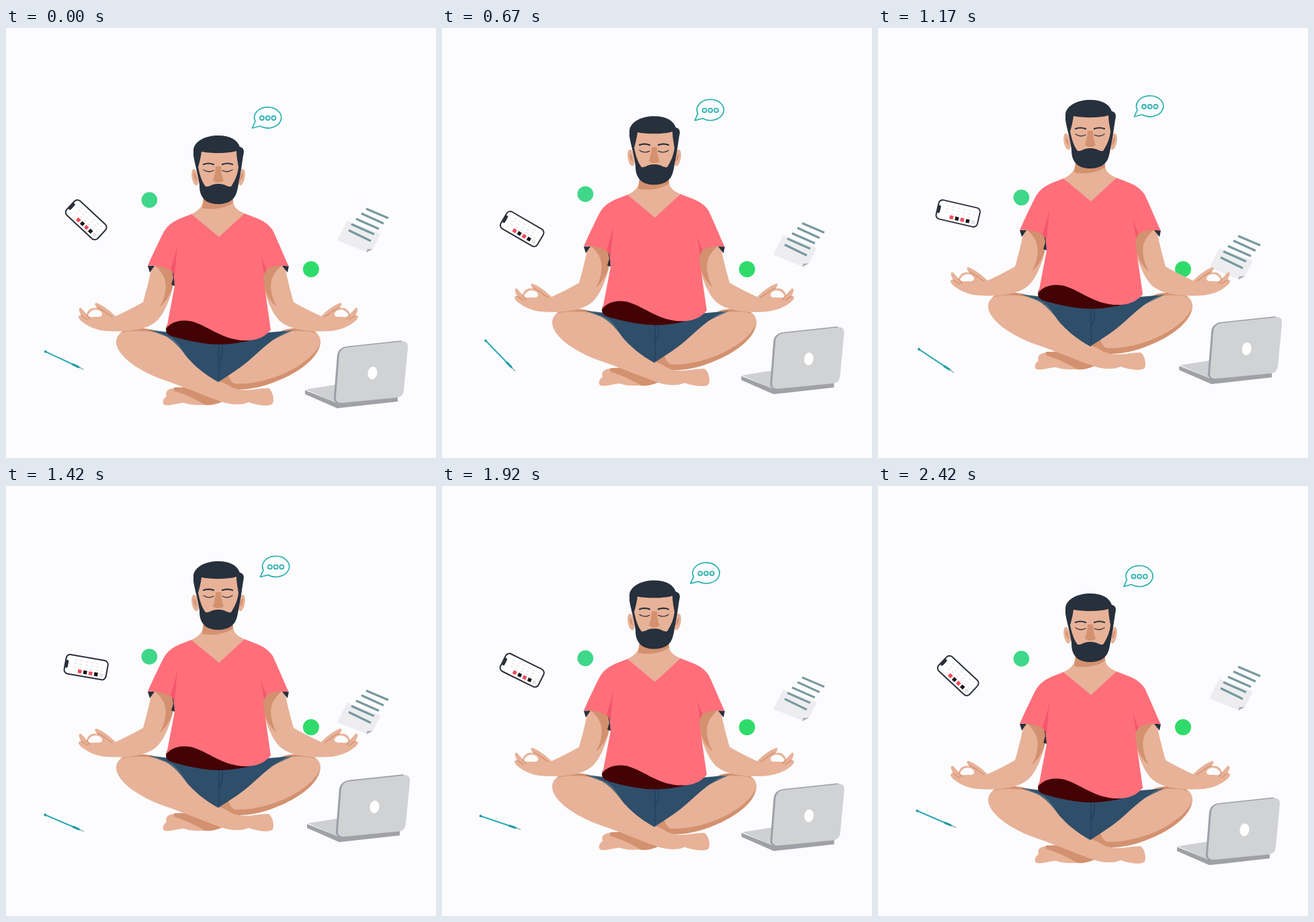
These frames come from a looping animation (640 by 640 pixels, 2510 ms). An HTML page:

```html
<!DOCTYPE html>
<html lang="en">
<head>
<meta charset="utf-8">
<title>Floating meditation</title>
<style>
  html, body { margin: 0; width: 100%; height: 100%; overflow: hidden; background: #fcfcfe; }
  svg { display: block; width: 100%; height: 100%; }
  .skin { fill: #e7b298; }
  .shade { fill: #d3916f; }
  .hair { fill: #27303d; }
  .shirt { fill: #ff6f7a; }
  .crease { fill: #f4566c; }
  .line { fill: none; stroke-linecap: round; stroke-linejoin: round; }
</style>
</head>
<body>
<svg viewBox="0 0 640 640">
  <defs>
    <g id="arm">
      <path class="skin" fill-rule="evenodd" d="M219 344 C214 372 209 390 204 408 C192 415 178 422 163 429
        C153 419 143 412 134 409 C131 410 133 414 136 417 C128 415 122 419 120 426
        L112 417 C107 415 108 421 112 428 C106 427 107 432 113 437 C122 444 134 450 150 451
        C180 453 206 450 222 438 C235 428 245 402 249 383 L252 344 Z
        M122 428 C125 419 135 417 141 422 C145 426 143 430 137 430 C131 429 126 432 122 428 Z"/>
      <path class="shade" d="M216 350 C234 361 240 376 237 392 C236 400 233 408 229 415 C240 406 247 392 249 380 L252 350 Z"/>
      <path class="line" stroke="#d3916f" stroke-width="1.4" d="M136 416 C143 418 148 424 158 430 M112 428 L121 434 M120 427 L125 433"/>
    </g>
    <path id="knee" class="shade" d="M170 454 C182 445 202 446 217 449 L234 456 C210 450 188 449 170 454 Z"/>
  </defs>

  <g id="note">
    <path fill="#ededef" d="M508 287 L493 316 L538 334 L546 329 L558 306 Z"/>
    <path fill="#a9adb3" d="M536 334 L538 329 L546 329 Z"/>
    <path class="line" style="stroke-linecap:butt" stroke="#76999d" stroke-width="3.2"
      d="M536 269 L569 283 M529 276 L562 291 M521 284 L555 299 M514 292 L548 307 M510 301 L543 317"/>
  </g>

  <circle cx="454" cy="359" r="12" fill="#2fdc6b"/>
  <circle id="badge" r="11.8" fill="#3fd78a"/>

  <g id="bubble" class="line" stroke="#33b3b4" stroke-width="1.8">
    <path d="M371 139 A20 15.5 0 1 1 378 146 L366.5 149 Z"/>
    <circle cx="381" cy="134" r="3"/>
    <circle cx="389.7" cy="134" r="3"/>
    <circle cx="398.4" cy="134" r="3"/>
  </g>

  <g id="phone">
    <rect x="-31.5" y="-14.5" width="63" height="29" rx="6" fill="#fff" stroke="#2a2f3c" stroke-width="2"/>
    <rect x="-31.5" y="-6" width="4.500" height="12" rx="2" fill="#2a2f3c"/>
    <path class="line" stroke="#e7e5e6" stroke-width="1.4" stroke-dasharray="3 5.2"
      d="M-18 -8 H24 M-18 -3 H24 M-18 2 H24"/>
    <g id="icons"></g>
  </g>

  <g id="pencil">
    <path class="line" stroke="#2fa9b3" stroke-width="2.100" d="M-31 0 H26"/>
    <path class="line" stroke="#1f9ba6" stroke-width="3.2" d="M15 0 H23"/>
    <path class="line" stroke="#8fb3ae" stroke-width="1.4" d="M26 0 H32"/>
    <circle cx="-30.5" r="1.9" fill="#1f9ba6"/>
  </g>

  <g id="laptop">
    <path fill="#9fa1a6" d="M445 539 L490 557 L583 549 V556 L493 566 L445 545 Z"/>
    <path fill="#cfd0d3" d="M446 538 L490 531 V557 Z"/>
    <path id="rim" fill="#9c9fa8" transform="translate(-3 .3)"/>
    <path id="lid" fill="#d0d2d4" d="M508 475 L588 466 Q599 465 598 476 L592 539 Q591 549 582 550 L499 558 Q490 558 491 549 L496 486 Q498 476 508 475 Z"/>
    <path class="line" stroke="#9c9fa8" stroke-width="1.6" d="M497 481 Q500 475 508 474.500 L588 466"/>
    <ellipse cx="545.5" cy="513.5" rx="7" ry="9.5" fill="#fff" transform="rotate(8 545.5 513.5)"/>
  </g>

  <g id="man">
    <!-- legs -->
    <path class="skin" d="M254 536 C242 535 236 541 239 548 C233 552 232 559 236 561 C246 563 255 558 265 558 C280 563 303 562 322 556 L330 535 Z"/>
    <path class="shade" d="M250 535 L282 534 L322 556 C314 560 305 562 296 561 C284 553 268 546 250 540 Z"/>
    <path class="shade" d="M427 450 C450 445 468 450 468 468 C466 490 438 512 402 526 C378 536 352 540 334 537 L316 525 Z"/>
    <path class="skin" d="M427 450 C450 445 468 450 468 468 C460 489 432 508 402 519 C376 528 352 531 339 529 C332 524 332 517 330 516 L395 455 Z"/>
    <path class="skin" d="M214 450 C190 444 164 448 164 468 C165 488 198 511 235 524 C262 533 292 546 320 556 C338 562 352 561 361 557 C374 561 388 564 396 560 C400 556 398 541 391 536 C372 535 350 546 328 530 L316 525 L260 465 Z"/>
    <use href="#knee"/>
    <use href="#knee" transform="translate(632 0) scale(-1 1)"/>
    <path fill="#4c6a7b" d="M212 449 L245 453 L390 453 L427 450 C410 458 398 463 388 470 L316 520 L272 493 C260 478 252 467 238 459 Z"/>
    <path fill="#2f4e6a" d="M225 452 L317 462 L418 451 C396 463 382 477 366 491 C352 504 334 515 316 527 C296 516 279 502 268 488 C260 476 256 466 244 460 Z"/>
    <path class="line" stroke="#233f59" stroke-width="1.3" d="M322 471 C323 482 322 489 318 496 M317 471 V523"/>

    <!-- arms and torso -->
    <use href="#arm"/>
    <use href="#arm" transform="translate(632 0) scale(-1 1)"/>
    <path class="hair" d="M211 354 L214 364 L221 354 Z M421 354 L419 364 L411 354 Z M247 360 L253 366 L251 384 L246 382 L249 372 Z"/>
    <path fill="#430204" d="M240 442 C236 450 238 456 248 459 C275 467 300 471 317 471 C350 470 378 464 394 449 L380 440 L262 430 Z"/>
    <path class="skin" d="M294 244 L293 260 C290 270 282 274 274 278 L317 313 L357 277 C346 272 339 268 338 258 V244 Z"/>
    <path class="shade" d="M294 254 H338 V260 C326 269 306 271 292 268 Z"/>
    <path class="shirt" d="M276 277 C258 284 243 288 234 305 C224 325 216 342 211 354 C223 352 238 356 249 363 L251 384
      L239 447 C245 437 262 433 278 437 C302 444 325 467 362 465 C378 464 388 457 394 449 L383 372 L385 361
      C395 354 410 352 421 355 C414 340 405 318 397 301 C387 286 372 283 355 276 L317 311 Z"/>
    <path class="crease" d="M255 323 C252 338 248 348 245 360 L251 368 Z M378 325 C380 340 383 350 388 359 L384 366 Z"/>

    <!-- head -->
    <ellipse class="skin" cx="281.5" cy="222" rx="5" ry="12.500" transform="rotate(-10 281.5 222)"/>
    <ellipse class="skin" cx="350.5" cy="222" rx="5" ry="12.500" transform="rotate(10 350.5 222)"/>
    <path class="shade" d="M279 215 Q283 217 284 228 Q279 224 279 215 Z M353 215 Q349 217 348 228 Q353 224 353 215 Z"/>
    <path class="hair" d="M279 181 C281 168 297 160 316 160 C334 160 345 167 348 177 C354 178 355 183 353 190
      C351 203 349 218 346 232 C344 245 342 251 336 256 C326 264 305 264 296 256 C290 250 288 244 288 234
      C286 217 281 203 279 190 Z"/>
    <path class="skin" d="M291 184 C305 187 330 187 343 183 C343 192 345 200 346 207 C345 217 341 227 335 236
      C329 237 325 231 316 232 C307 231 303 237 297 236 C291 228 288 217 286 207 C288 200 290 192 291 184 Z"/>
    <path class="shade" d="M312 206 C312 214 310 220 308 227 C312 231 320 231 324 227 C321 220 320 214 320 206 Z"/>
    <path class="line" stroke="#27303d" stroke-width="2.2" d="M294 203 Q301 200 309 203 M322 203 Q330 200 337 203"/>
    <path class="line" stroke="#3b3840" stroke-width="1.3" d="M294 211 Q301 216 309 212 M322 212 Q330 216 337 211"/>
  </g>
</svg>

<script>
const LOOP = 2510, STEPS = 30;
const KEYS = [0, 5, 10, 14, 20, 25, 29];
const $ = id => document.getElementById(id);

// One value per key step
const tracks = {
  manY:    [0, -13.5, -39, -53, -35.4, -10, 0],
  lapX:    [0, 0, 1, 3.2, 2, 0, 0],
  lapY:    [0, -13.3, -26, -36, -31, -16, -1.7],
  bubX:    [0, 6, 12, 15, 7.2, 1.4, -.6],
  bubY:    [0, -7, -14, -17, -8.3, -1.5, .7],
  noteY:   [0, 13, 27.5, 40.5, 25, 10, 0],
  badgeY:  [256, 248, 248, 252.3, 255, 257, 257],
  phoneY:  [285.5, 301, 294, 276, 268.8, 278.5, 282.3],
  phoneR:  [43, 35, 26, 13, 13.5, 35, 43],
  pencilY: [494.5, 490.5, 487, 495, 505, 497.7, 495.5],
  pencilR: [25, 37.5, 47.5, 33.7, 16.4, 21.3, 23.3]
};

// Smooth periodic curve through the key values
function curve(vals, k) {
  const n = KEYS.length;
  const at = i => {
    const wrap = Math.floor(i / n), j = i - wrap * n;
    return [KEYS[j] + wrap * STEPS, vals[j]];
  };
  const tangent = i => {
    const [a, p] = at(i - 1), [b, q] = at(i), [c, r] = at(i + 1);
    return ((c - b) * (q - p) / (b - a) + (b - a) * (r - q) / (c - b)) / (c - a);
  };
  let i = n - 1;
  while (KEYS[i] > k) i--;
  const [a, p] = at(i), [b, q] = at(i + 1), h = b - a, u = (k - a) / h;
  const s = u * u * (3 - 2 * u);
  return p + (q - p) * s + h * u * (1 - u) * ((1 - u) * tangent(i) - u * tangent(i + 1));
}

function place(id, x, y, turn = 0) {
  $(id).setAttribute("transform", `translate(${x} ${y}) rotate(${turn})`);
}

function stepAt(t) {
  let k = STEPS - 1;
  while (Math.round(k * 25 / 3) * 10 > t) k--;
  return k;
}

function draw(k) {
  const v = name => curve(tracks[name], k);
  place("man", 0, v("manY"));
  place("laptop", v("lapX"), v("lapY"));
  place("bubble", v("bubX"), v("bubY"));
  place("note", 0, v("noteY"));
  place("badge", 213.4, v("badgeY"));
  place("phone", 119.2, v("phoneY"), v("phoneR"));
  place("pencil", 86.3, v("pencilY"), v("pencilR"));
}

$("rim").setAttribute("d", $("lid").getAttribute("d"));
$("icons").innerHTML = ["#f04a5c", "#17131a", "#f04a5c", "#17131a", "#e4e2e4"]
  .map((c, i) => `<rect x="${i * 8.2 - 11}" y="5.2" width="5.4" height="5.4" fill="${c}"/>`).join("");

const start = performance.now();
function tick() {
  draw(stepAt((performance.now() - start) % LOOP));
  requestAnimationFrame(tick);
}
draw(0);
requestAnimationFrame(tick);
</script>
</body>
</html>
```
